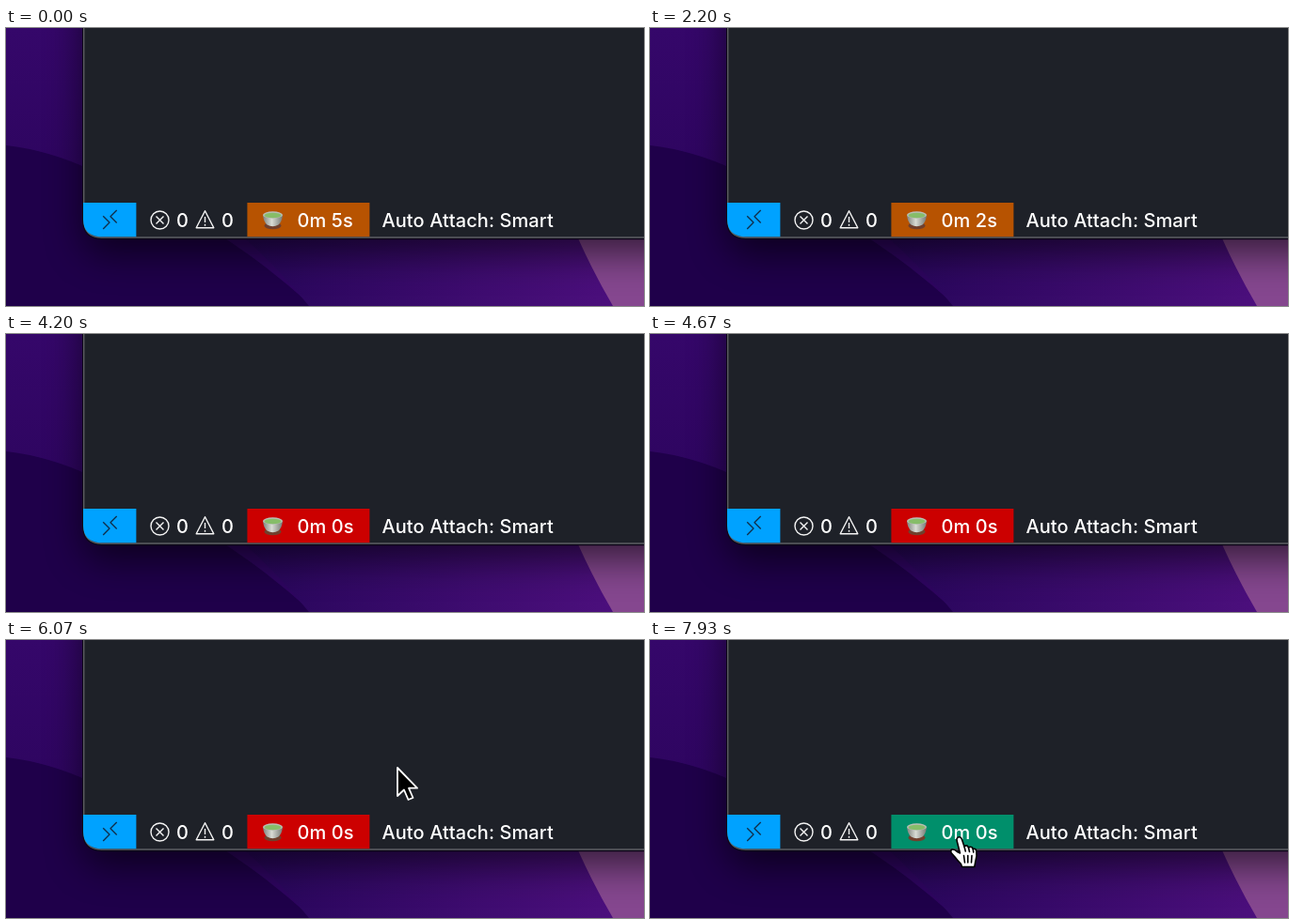
Recreate the animation shown at these times as an HTML page. Size 678 by 296 pixels, loop 8 s.

```html
<!DOCTYPE html>
<html lang="en">
<head>
<meta charset="utf-8">
<title>Status bar timer</title>
<style>
  html, body { margin: 0; width: 100%; height: 100%; overflow: hidden; background: #1c0042; }
  svg { display: block; }
  text { font: 500 20px Inter, sans-serif; letter-spacing: .08px; fill: #fff; }
  .icon { fill: none; stroke: #f4f4f4; stroke-width: 1.4; stroke-linejoin: round; }
</style>
</head>
<body>
<svg width="678" height="296" viewBox="0 0 678 296">
  <defs>
    <linearGradient id="wall" x2="0" y2="1">
      <stop offset="0" stop-color="#35076a"/>
      <stop offset=".5" stop-color="#2e0560"/>
    </linearGradient>
    <linearGradient id="ridge" gradientUnits="userSpaceOnUse" x1="250" y1="0" x2="640" y2="0">
      <stop offset="0" stop-color="#27065a"/>
      <stop offset="1" stop-color="#4b0f7c"/>
    </linearGradient>
    <linearGradient id="cup" x2="1">
      <stop offset="0" stop-color="#7d827d"/>
      <stop offset=".45" stop-color="#d8dbd4"/>
      <stop offset="1" stop-color="#757a75"/>
    </linearGradient>
    <filter id="blur" x="-20%" y="-30%" width="140%" height="160%"><feGaussianBlur stdDeviation="20"/></filter>
    <clipPath id="frame"><path d="M82-5H690V224H102Q82 224 82 204Z"/></clipPath>
  </defs>

  <!-- wallpaper -->
  <rect width="678" height="296" fill="url(#wall)"/>
  <path d="M0 125Q45 130 90 151Q220 200 325 296H0Z" fill="#1f004a"/>
  <path d="M240 212Q285 250 322 296H678V200H240Z" fill="url(#ridge)"/>
  <path d="M602 212L608 224Q625 262 645 296H678V212Z" fill="#85478f"/>
  <rect x="82" y="-60" width="700" height="300" rx="20" filter="url(#blur)" opacity=".6"/>

  <!-- editor window -->
  <path d="M81-5H690V225.200H102Q81 225.200 81 204Z" fill="#0d0618"/>
  <g clip-path="url(#frame)">
    <rect x="82" width="600" height="224" fill="#1e2128"/>
    <path d="M82.700 0V204Q82.700 223 102 223H678" fill="none" stroke="#5b5c61" stroke-width="1.400"/>
    <path d="M82 186H138.400V222.200H99Q82 220 82 204Z" fill="#00a2ff"/>
  </g>
  <path class="icon" style="stroke:#10314f" d="M103.200 200.300L110 207.100L103.200 213.900M117.700 194L111 200.700L117.700 207.400"/>

  <g class="icon">
    <circle cx="163.500" cy="204.500" r="9.500"/>
    <path d="M159.500 200.500l8 8m0-8l-8 8"/>
    <path d="M211.500 194.700L220.800 212.700H202.200Z"/>
    <path d="M211.500 201v6m0 1.800v2"/>
  </g>
  <text x="181" y="212">0</text>
  <text x="229" y="212">0</text>

  <rect id="timerBox" x="256.400" y="186" width="130" height="36.200"/>
  <g>
    <ellipse cx="283.500" cy="210.500" rx="9" ry="3.800" fill="#70402d"/>
    <path d="M273 199Q273.500 206 277.500 209.500Q283.500 213 289.500 209.500Q293.500 206 294 199Z" fill="url(#cup)"/>
    <ellipse cx="283.500" cy="199" rx="10.500" ry="3.700" fill="#b9beb5"/>
    <ellipse cx="283.500" cy="199.500" rx="9" ry="2.800" fill="#86bd69"/>
  </g>
  <text id="timer" x="309.500" y="212"></text>
  <text id="attach" x="399.500" y="212">Auto Attach: Smart</text>

  <!-- pointers, hot spot at 0,0 -->
  <path id="arrow" d="M1 1V31L8 24.500L12.500 35L17.500 33L13 22.700H22Z" fill="#000" stroke="#fff" stroke-width="1.800" stroke-linejoin="round"/>
  <g id="hand" stroke="#000" stroke-width="1.600" stroke-linejoin="round" stroke-linecap="round">
    <path fill="#fff" d="M-2 2Q-1.500-.500 1-.300Q2.800 0 3.500 2.500L6 10Q7.500 8.300 9.500 9.300L10.500 11Q12.500 9.500 14.500 11L15.200 12.500Q18 11.500 18.800 14.500Q19.700 20 18 25L16.800 31.500H3.500L2.500 28.500Q-1 25-4 21L-8 16.500Q-9 14-7 13Q-4.500 12.500-1.500 15.500L1.500 17L-1.700 4.500Z"/>
    <path fill="none" d="M6 10L7.300 15M10.500 11L11.500 15.500M15.200 12.500L15.800 16M5.500 19.500L6.500 27M9.800 19.500V27M14 19.500L13.500 27"/>
  </g>
</svg>
<script>
  const LOOP = 8000, FIRST_TICK = 200;
  const HOVER = 6480;
  // time, x, y of the pointer's hot spot
  const path = [
    [5450, 570, -40], [6070, 415, 135], [6640, 343, 207],
    [7000, 343, 207], [7600, 328, 210], [LOOP, 328, 210]
  ];
  const el = id => document.getElementById(id);
  const ease = p => p * p * (3 - 2 * p);

  function pointerAt(t) {
    const i = path.findIndex(([end]) => t < end);
    if (i < 1) return null;
    const [t0, x0, y0] = path[i - 1], [t1, x1, y1] = path[i];
    const p = ease((t - t0) / (t1 - t0));
    return [x0 + (x1 - x0) * p, y0 + (y1 - y0) * p];
  }

  function draw(t) {
    const ticks = Math.floor((t - FIRST_TICK) / 1000) + 1;
    const left = Math.max(0, 5 - ticks);
    const shift = left === 1 ? -4 : 0;
    const hovered = t >= HOVER;
    el('timer').textContent = `0m ${left}s`;
    el('timerBox').setAttribute('width', 130 + shift);
    el('timerBox').setAttribute('fill', hovered ? '#008f6b' : left ? '#b75301' : '#cc0000');
    el('attach').setAttribute('x', 399.5 + shift);

    const pointer = pointerAt(t);
    el('arrow').style.display = pointer && !hovered ? '' : 'none';
    el('hand').style.display = pointer && hovered ? '' : 'none';
    if (pointer) el(hovered ? 'hand' : 'arrow').setAttribute('transform', `translate(${pointer})`);
  }

  const start = performance.now();
  function tick() {
    draw((performance.now() - start) % LOOP);
    requestAnimationFrame(tick);
  }
  tick();
</script>
</body>
</html>
```
